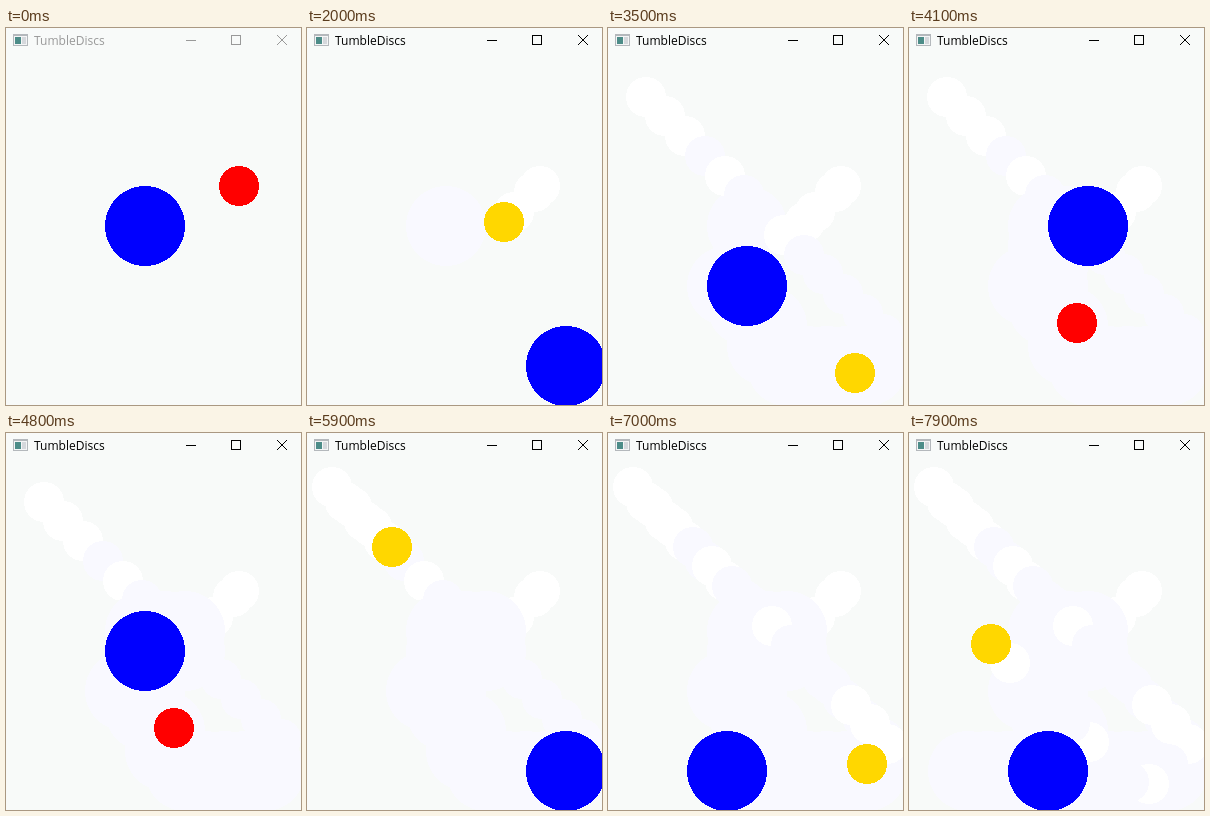
Animation, 295 px wide and 377 px high, one loop 8000 ms. Source, as an HTML page with a canvas:

```html
<!DOCTYPE html>
<html lang="en">
<head>
<meta charset="utf-8">
<title>TumbleDiscs</title>
<style>
  html, body { margin: 0; width: 100%; height: 100%; overflow: hidden; background: #f8faf9; }
  canvas { display: block; width: 295px; height: 377px; }
</style>
</head>
<body>
<canvas id="stage" width="295" height="377"></canvas>
<script>
const ctx = document.getElementById('stage').getContext('2d');
const LOOP = 8000, TICK = 100;
const BALL = 20, DISC = 40, SPEED = 19.75, STRIDE = 20;
const WALL_X = 280.6, WALL_Y = 359.6;
const PALE = '#f9f9ff', WHITE = '#ffffff';
const LEFT = [-1, 0], RIGHT = [1, 0], UP = [0, -1], DOWN = [0, 1];

// Times are in ticks. White marks repeat every "cycle" ticks of a run.
const WHITE_BEATS = [0, 1, 2, 4, 7];
const ballRuns = [
  { start: 0, launch: 6.7, stop: 6.7 + 36 / SPEED, from: [233, 158], dir: [-1, 1], cycle: 1 },
  { start: 21, launch: 21, stop: 39, from: [37.5, 68.5], dir: [1, 1], cycle: 18 },
  { start: 56, launch: 56, stop: 80, from: [25.3, 54.3], dir: [1, 1], cycle: 11 }
];

// Each leg is a held key: direction, press, release.
const discRuns = [
  { start: 0, from: [139, 198], legs: [] },
  { start: 20, from: [259, 338], legs: [
    [LEFT, 26, 31], [UP, 30, 34], [LEFT, 32, 34], [RIGHT, 34, 35], [UP, 35, 38],
    [RIGHT, 39, 41], [DOWN, 45, 46], [LEFT, 46, 48]
  ] },
  { start: 56, from: [259, 338], legs: [[LEFT, 63, 72], [LEFT, 73, 74], [RIGHT, 75, 79]] }
];

const clamp = (v, lo, hi) => Math.min(hi, Math.max(lo, v));
const bounce = (v, wall) => Math.round(v > wall ? 2 * wall - v : v);
const runAt = (runs, tick) => runs.filter(r => r.start <= tick).pop();

function ballAt(tick) {
  const { from, dir, launch, stop } = runAt(ballRuns, tick);
  const way = SPEED * (clamp(tick, launch, stop) - launch);
  return [bounce(from[0] + dir[0] * way, WALL_X), bounce(from[1] + dir[1] * way, WALL_Y)];
}

function discAt(tick) {
  const { from, legs } = runAt(discRuns, tick);
  return legs.reduce(([x, y], [dir, press, release]) => {
    const way = STRIDE * (clamp(tick, press, release) - press);
    return [x + dir[0] * way, y + dir[1] * way];
  }, from);
}

function markColor(tick) {
  const run = runAt(ballRuns, tick);
  return WHITE_BEATS.includes((tick - run.start) % run.cycle) ? WHITE : PALE;
}

function rect(x, y, w, h, color) {
  ctx.fillStyle = color;
  ctx.fillRect(x, y, w, h);
}

// Row by row, for a hard edge without smoothing.
function circle([x, y], r, color) {
  for (let row = -r; row < r; row++) {
    const half = Math.round(Math.sqrt(r * r - (row + 0.5) ** 2));
    rect(x - half, y + row, 2 * half, 1, color);
  }
}

function titleBar(active) {
  const ink = active ? '#000' : '#999';
  rect(7, 6, 15, 12, '#b4b8bc');
  rect(8, 8, 13, 9, '#f4f5f6');
  rect(9, 9, 6, 7, '#4c8c88');
  rect(16, 9, 4, 7, '#d5d8dc');

  ctx.font = '12px "Open Sans", "Noto Sans", sans-serif';
  ctx.fillStyle = ink;
  ctx.fillText('TumbleDiscs', 28, 17);

  rect(180, 12, 10, 1, ink);
  ctx.strokeStyle = ink;
  ctx.lineWidth = 1;
  ctx.strokeRect(225.5, 7.5, 9, 9);
  ctx.beginPath();
  ctx.moveTo(271, 7);
  ctx.lineTo(281, 17);
  ctx.moveTo(281, 7);
  ctx.lineTo(271, 17);
  ctx.stroke();
}

function leaveMark(place, tick, r, color) {
  const here = place(tick);
  if (String(here) !== String(place(tick + 1))) circle(here, r, color);
}

function draw(tick) {
  rect(0, 0, 295, 377, '#f8faf9');
  // Faint marks stay wherever a circle has been.
  for (let i = 0; i < tick; i++) {
    leaveMark(discAt, i, DISC, PALE);
    leaveMark(ballAt, i, BALL, markColor(i));
  }
  const playing = (tick >= 20 && tick < 39) || tick >= 56;
  circle(discAt(tick), DISC, '#0000ff');
  circle(ballAt(tick), BALL, playing ? '#ffd700' : '#ff0000');
  titleBar(tick >= 6);
}

let start = null, shown = -1;
function frame(now) {
  if (start === null) start = now;
  const tick = Math.floor(((now - start) % LOOP) / TICK);
  if (tick !== shown) draw(shown = tick);
  requestAnimationFrame(frame);
}
draw(0);
requestAnimationFrame(frame);
</script>
</body>
</html>
```
